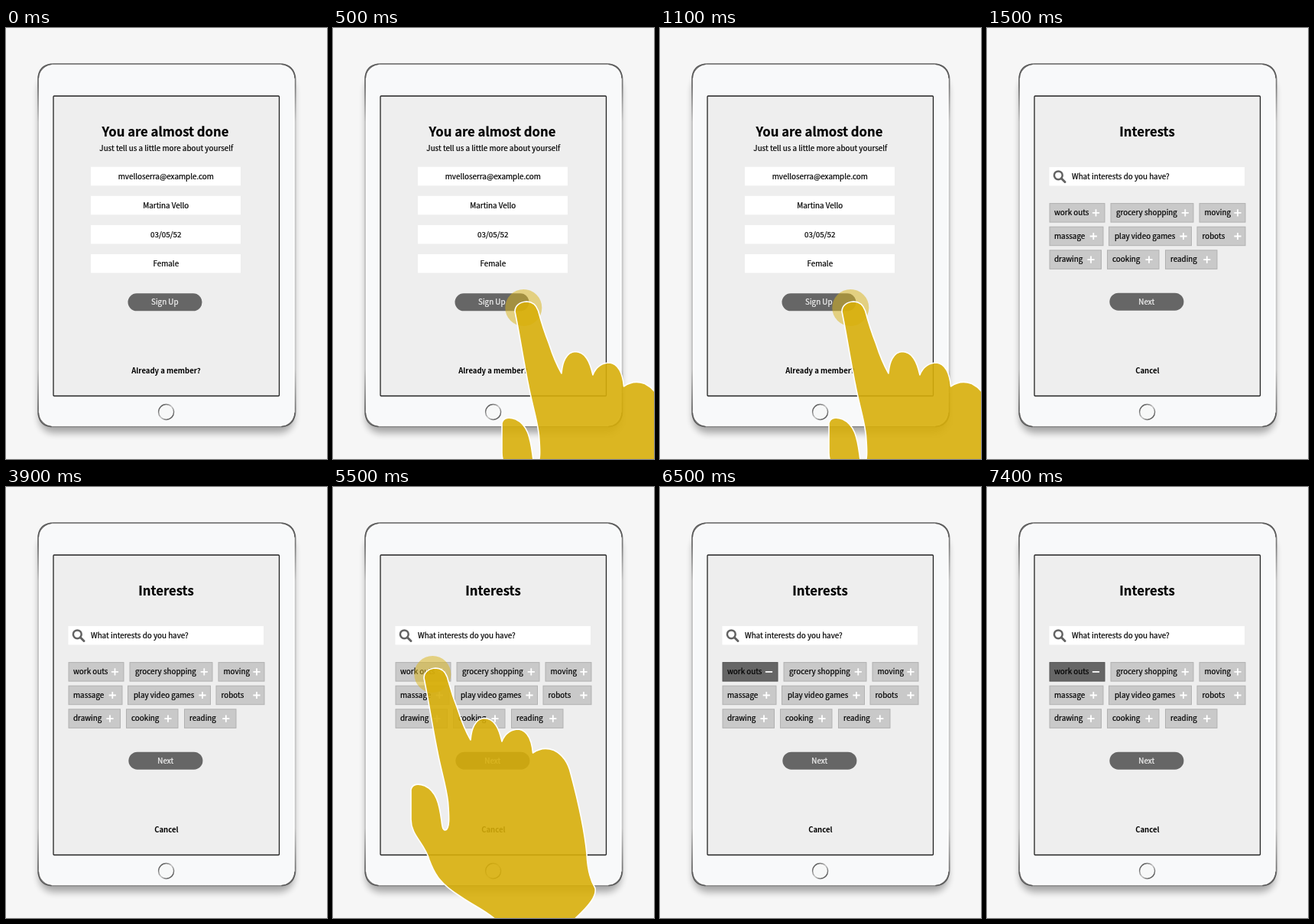
An HTML page for the animation above (8000 ms loop, 420 px wide and 564 px high).

```html
<!DOCTYPE html>
<html lang="en">
<head>
<meta charset="utf-8">
<title>Sign up flow</title>
<style>
  html, body { margin: 0; width: 100%; height: 100%; overflow: hidden; background: #f6f6f6; }
  svg { display: block; width: 420px; height: 564px; }
  text {
    font: 400 9.85px "Noto Sans CJK SC", "Noto Sans CJK JP", "Noto Sans", sans-serif;
    fill: #000; stroke: #000; stroke-width: .22px;
  }
  .mid { text-anchor: middle; }
  .title { font-size: 16.7px; font-weight: 700; }
  .link { font-size: 9.55px; font-weight: 700; stroke: none; }
  .light { fill: #f4f4f4; stroke: #f4f4f4; }
</style>
</head>
<body>
<svg viewBox="0 0 420 564" xmlns="http://www.w3.org/2000/svg">
  <defs>
    <linearGradient id="ring" x1="0" y1="0" x2="1" y2="1">
      <stop offset="0" stop-color="#333"/>
      <stop offset=".5" stop-color="#c4c4c4"/>
      <stop offset="1" stop-color="#2c2c2c"/>
    </linearGradient>
    <linearGradient id="rim" x1="0" y1="0" x2="0" y2="1">
      <stop offset="0" stop-color="#858585"/>
      <stop offset=".06" stop-color="#7a7a7a"/>
      <stop offset=".16" stop-color="#c6c6c6"/>
      <stop offset=".84" stop-color="#c6c6c6"/>
      <stop offset=".95" stop-color="#7a7a7a"/>
      <stop offset="1" stop-color="#959595"/>
    </linearGradient>
    <filter id="blur" x="-10%" y="-10%" width="120%" height="120%">
      <feGaussianBlur stdDeviation="5"/>
    </filter>
  </defs>

  <rect width="420" height="564" fill="#f6f6f6"/>
  <rect x="43" y="62" width="334" height="468" rx="20" fill="#000" opacity=".32" filter="url(#blur)"/>
  <rect x="42" y="47" width="336.5" height="475" rx="20" fill="#f8f9fa" stroke="url(#rim)" stroke-width="2"/>
  <rect x="43.8" y="48.8" width="333" height="471.4" rx="18.5" fill="none" stroke="#fff" stroke-width="1.4"/>
  <g fill="none" stroke="#5c5c5c" stroke-width="1.5" stroke-linecap="round">
    <path d="M42.5 65Q43 49 59 47.4M361 47.4Q377 49 378 65"/>
    <path d="M42.5 504Q43 520 59 521.6M361 521.6Q377 520 378 504"/>
  </g>
  <rect x="62" y="89" width="295.5" height="392.5" rx="1" fill="#eee" stroke="#222" stroke-width="1.3"/>
  <circle cx="209.6" cy="502.5" r="10" fill="#f7f8f8" stroke="url(#ring)" stroke-width="1.4"/>

  <g id="signup"></g>
  <g id="interests"></g>
  <g id="hand">
    <circle cx="130.3" cy="245" r="24" fill="#dab620" opacity=".53"/>
    <path fill="#d8af08" fill-opacity=".89" stroke="#fff" stroke-width="1.6" stroke-linejoin="round"
      d="M119 250C119 242 126 237.500 134 237C142 237 147 242 149.500 249
         C153 262 158 278 163.500 292C168 306 173 319 180 331
         C181 317 186 303 198 302.500C211 303 217 315 221 333
         C225 322 234 317 243 317C255 319 260 331 261.500 348
         C270 342 280 341 289 344.500C302 351 308 362 311 375
         C319 405 329 448 332 480C333 503 337 515 343 525C345 534 338 546 312 569
         L216 569C202 555 184 548 167 536C140 519 133 507 126 488
         C120 466 102 456 102 435V396C104 388 112 388 120 391
         C135 398 139 414 142 437C143 446 144 449 147 449
         C153 448 152 431 150.500 412C148 390 141 370 136.500 345C130 313 125 279 119 250Z"/>
  </g>
</svg>
<script>
const LOOP = 8000;
const $ = id => document.getElementById(id);

const rect = (x, y, w, h, attrs) =>
  `<rect x="${x}" y="${y}" width="${w}" height="${h}" ${attrs}/>`;
const text = (x, y, label, cls = "mid") =>
  `<text x="${x}" y="${y}" class="${cls}">${label}</text>`;
const button = (x, y, label) =>
  rect(x, y, 97, 23, 'rx="11.5" fill="#666"') + text(x + 48.3, y + 15, label, "mid light");

const fields = ["mvelloserra@example.com", "Martina Vello", "03/05/52", "Female"];
$("signup").innerHTML =
  text(208.5, 141.7, "You are almost done", "mid title") +
  text(209.8, 160.5, "Just tell us a little more about yourself") +
  fields.map((label, i) => {
    const y = 181.7 + i * 38.1;
    return rect(111, y, 196, 24.5, 'fill="#fff"') + text(209.3, y + 15.8, label);
  }).join("") +
  button(159.5, 347.3, "Sign Up") +
  text(209.5, 452, "Already a member?", "mid link");

// label, left, right, text start, sign centre
const rows = [
  [["work outs", 82, 154, 88, 142.5], ["grocery shopping", 162, 270, 169, 259.3], ["moving", 278, 338, 284.5, 328]],
  [["massage", 82, 152, 88, 139.3], ["play video games", 159.5, 267.5, 167, 257], ["robots", 275, 338, 281.5, 328]],
  [["drawing", 82, 149.5, 88, 136], ["cooking", 157.5, 225, 164, 212], ["reading", 233.5, 301, 240, 287.8]]
];

function chip([label, left, right, start, sign], top, on) {
  const mid = top + 12.3;
  const bar = `M${sign - 4.6} ${mid}h9.2`;
  const post = on ? "" : `M${sign} ${mid - 4.6}v9.2`;
  const look = on ? 'fill="#666" stroke="#555"' : 'fill="#c9c9c9" stroke="#b1b1b1"';
  return rect(left, top, right - left, 24.5, look) +
    text(start, top + 15.5, label, "") +
    `<path d="${bar}${post}" stroke="#fff" stroke-width="1.8"/>`;
}

const chips = picked => rows.map((row, r) =>
  row.map((c, i) => chip(c, 229.6 + r * 30.6, picked && !r && !i)).join("")).join("");

$("interests").innerHTML =
  text(209.5, 141.7, "Interests", "mid title") +
  rect(81.5, 182, 255.5, 24.5, 'fill="#fff"') +
  '<g fill="none" stroke="#636363"><circle cx="93.3" cy="192.8" r="5.4" stroke-width="2.5"/>' +
  '<path d="M97.5 197L102 201.5" stroke-width="3" stroke-linecap="round"/></g>' +
  text(111, 198.3, "What interests do you have?", "") +
  '<g id="plain">' + chips(false) + '</g><g id="picked">' + chips(true) + '</g>' +
  button(160.4, 346.7, "Next") +
  text(209.8, 452, "Cancel", "mid link");

const show = (id, on) => $(id).setAttribute("display", on ? "inline" : "none");

function draw(t) {
  const tapSignup = t >= 500 && t < 1500;
  const tapChip = t >= 5500 && t < 6500;
  show("signup", t < 1500);
  show("interests", t >= 1500);
  show("plain", t < 6500);
  show("picked", t >= 6500);
  show("hand", tapSignup || tapChip);
  $("hand").setAttribute("transform", tapSignup ? "translate(119 121)" : "");
}

const begin = performance.now();
function tick() {
  draw((performance.now() - begin) % LOOP);
  requestAnimationFrame(tick);
}
tick();
</script>
</body>
</html>
```
